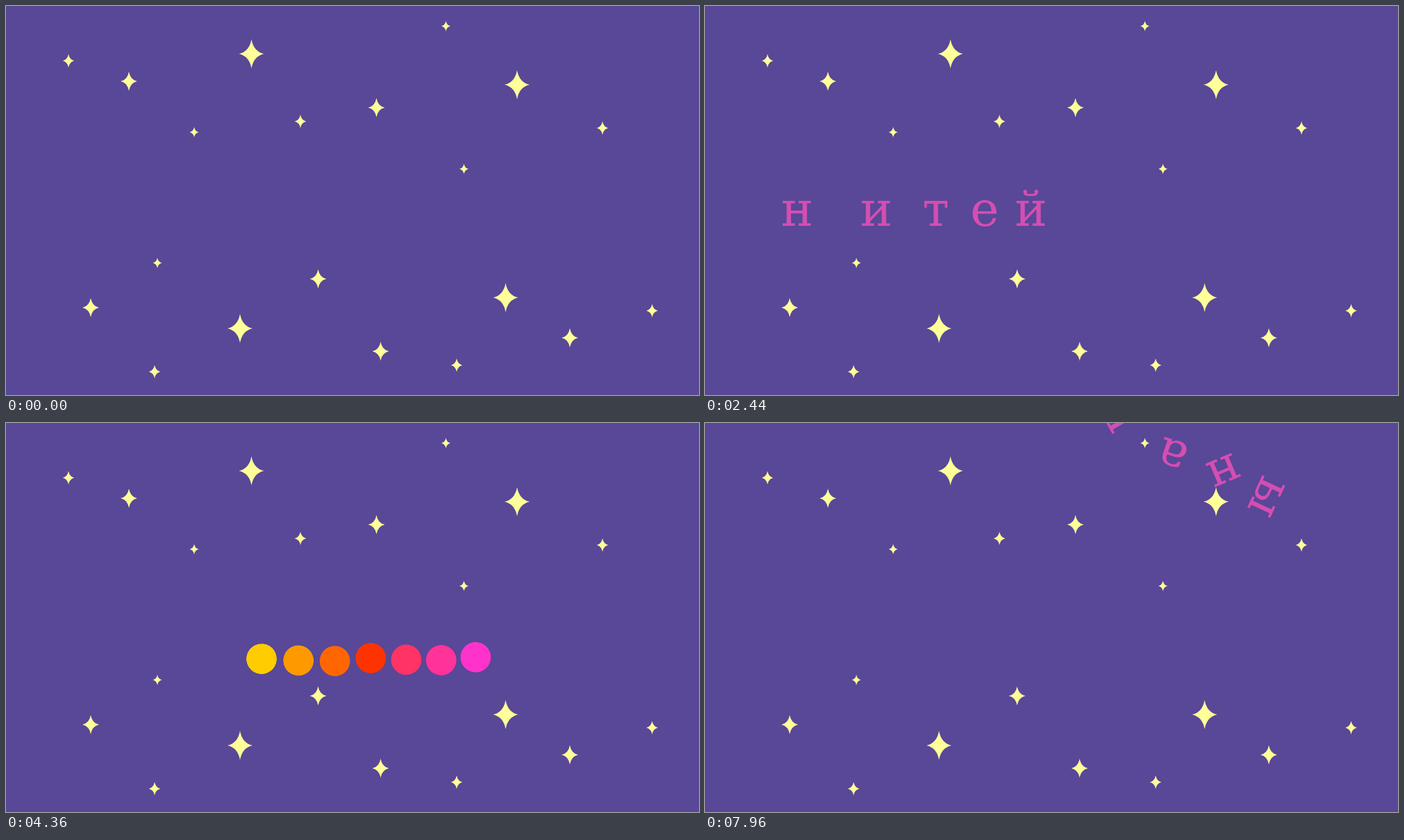
An HTML page for the animation above (8 s loop, 998 px wide and 561 px high).

```html
<!DOCTYPE html>
<html lang="ru">
<head>
<meta charset="utf-8">
<style>
  html, body { margin: 0; width: 100%; height: 100%; overflow: hidden; background: #594797; }
  svg { display: block; width: 100%; height: 100%; }
  text { font: 70px "DejaVu Serif", "Noto Serif", serif; text-anchor: middle; }
</style>
</head>
<body>
<svg id="stage" viewBox="0 0 998 561">
  <rect width="998" height="561" fill="#594797"/>
</svg>
<script>
const LOOP = 8000, STEP = 40;
const PINK = [212, 78, 178], WHITE = [255, 240, 250];
const stage = document.getElementById('stage');

const clamp = v => Math.max(0, Math.min(1, v));
const lerp = (a, b, p) => a + (b - a) * p;
const mix = (a, b, p) => `rgb(${a.map((v, i) => Math.round(lerp(v, b[i], p)))})`;

function add(parent, tag, attrs = {}, label = '') {
  const el = document.createElementNS('http://www.w3.org/2000/svg', tag);
  set(el, attrs);
  el.textContent = label;
  parent.appendChild(el);
  return el;
}
function set(el, attrs) {
  for (const key in attrs) el.setAttribute(key, attrs[key]);
}

// Falls, then rebounds three times, each hop a shorter parabola
function bounce(p) {
  let u = p * 2.75, half = 1, mid = 0;
  while (u > mid + half && half > 0.2) {
    mid += half + half / 2;
    half /= 2;
  }
  return 1 - half * half + (u - mid) ** 2;
}

// Stars
function star(x, y, size) {
  add(stage, 'path', {
    d: 'M0-21Q3-3.5 18 0Q3 3.5 0 21Q-3 3.5-18 0Q-3-3.5 0-21Z',
    fill: '#ffff99',
    transform: `translate(${x} ${y}) scale(${size})`
  });
}
const [TINY, SMALL, MEDIUM, BIG] = [.36, .46, .66, 1];
const pairs = [
  [353.5, 69, BIG], [736, 113.5, BIG], [533.5, 146.5, MEDIUM], [424, 166.5, SMALL], [859, 176, SMALL]
];
const singles = [
  [177, 108.5, MEDIUM], [449.5, 393.5, MEDIUM], [122, 435, MEDIUM], [812, 478.5, MEDIUM],
  [90, 79, SMALL], [930.5, 439.5, SMALL],
  [633.5, 29, TINY], [271, 182, TINY], [659.5, 235, TINY], [218, 370.5, TINY]
];
for (const s of singles) star(...s);
for (const [x, y, size] of pairs) {
  star(x, y, size);
  star(1073 - x, y + 351.5, size);
}

// Sliding phrase: natural letter widths with even tracking
function letterCentres(phrase, first, last) {
  const pen = document.createElement('canvas').getContext('2d');
  pen.font = '70px "DejaVu Serif", "Noto Serif", serif';
  let left = 0;
  const mids = [...phrase].map(ch => {
    const w = pen.measureText(ch).width;
    left += w;
    return left - w / 2;
  });
  const n = mids.length - 1;
  const gap = (last - first - mids[n] + mids[0]) / n;
  return mids.map((m, i) => first + m - mids[0] + gap * i);
}

const PHRASE = 'из нитей';
const centres = letterCentres(PHRASE, 290.5, 592.5);
const slide = [...PHRASE].map((ch, i) => ({ i, x: centres[i], el: add(stage, 'text', { y: 317 }, ch) }));

function drawSlide(t) {
  for (const { i, x, el } of slide) {
    const rank = i + 1.115;
    const travel = 152.5 * rank;
    const enter = 897 * (1 - clamp((t - 400) / travel));
    const leave = Math.max(0, t - 2160) * 3.19 / (i + .26);
    const phase = clamp((t - 400 - travel) / (64.4 * rank));
    const glow = 1 - Math.abs(2 * phase - 1);
    set(el, { x: x + enter - leave, fill: mix(PINK, WHITE, glow) });
  }
}

// Balls that turn into letters, then fly off along an arc
const R = 22;
const arcY = [106, 68, 43, -10];
const balls = [...'сотканы'].map((ch, i) => {
  const back = 6 - i;
  const clip = add(stage, 'clipPath', { id: 'clip' + i });
  const mask = add(clip, 'circle');
  const group = add(stage, 'g', { 'clip-path': `url(#clip${i})` });
  return {
    i, mask, group,
    text: add(group, 'text', { y: 18, 'stroke-linejoin': 'round' }, ch),
    disc: add(group, 'circle', { r: R }),
    color: [255, Math.max(51, 204 - 51 * i), i > 3 ? 51 * (i - 2) : 0],
    x: 368 + 53.5 * i - .35 * i * i,
    y: 344 - .4 * i,
    lag: 13 - 10 * (i % 3),
    letterX: 360.5 + 45.3 * i + 1.13 * i * i,
    endX: 808 - 58 * back - 4.5 * back * back,
    endY: arcY[back] ?? 110 - 40 * back,
    turn: 115 + 42 * back
  };
});

function drawBalls(t) {
  const away = Math.max(0, (t - 7360) / 600);
  for (const b of balls) {
    const p = clamp((t - 4720 - 375 * b.i) / 375);
    const fall = bounce(clamp((t - 3680 - b.lag) / 680));
    const x = lerp(b.x, b.letterX, p);
    const y = lerp(lerp(-25, b.y, fall), 340, p);
    const angle = -60 * (1 - p) + b.turn * away;
    const paint = mix(b.color, PINK, p * p);
    const bold = 44 * (1 - p);
    // A bolder letter is scaled down so its outer size stays the same
    set(b.text, {
      fill: paint, stroke: paint, 'stroke-width': bold,
      transform: `translate(0 18) scale(${44 / (44 + bold)}) translate(0 -18)`.replace(/18/g, '0'),
      y: 18 * 44 / 44,
      visibility: p > 0 ? 'inherit' : 'hidden'
    });
    set(b.text, { transform: `scale(${44 / (44 + bold)})` });
    set(b.disc, { fill: paint, visibility: p > 0 ? 'hidden' : 'inherit' });
    set(b.mask, { r: R + 40 * p });
    set(b.group, {
      transform: `translate(${lerp(x, b.endX, away)} ${lerp(y, b.endY, away)}) rotate(${angle})`,
      visibility: t > 3680 ? 'visible' : 'hidden'
    });
  }
}

function draw(t) {
  drawSlide(t);
  drawBalls(t);
}

const start = performance.now();
function tick() {
  const t = (performance.now() - start) % LOOP;
  draw(Math.floor(t / STEP) * STEP);
  requestAnimationFrame(tick);
}
draw(0);
requestAnimationFrame(tick);
</script>
</body>
</html>
```
